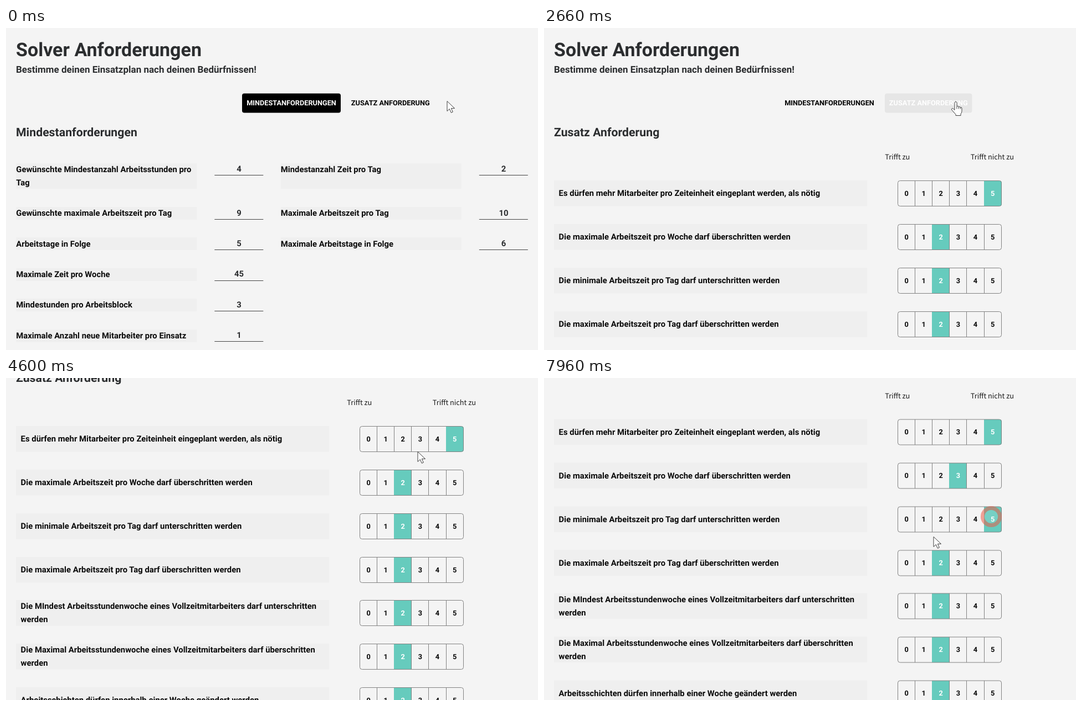
Write an HTML page that moves like this. It is 960 by 583 pixels and loops after 8 s.

```html
<!DOCTYPE html>
<html lang="de">
<head>
<meta charset="utf-8">
<title>Solver Anforderungen</title>
<style>
  html, body { margin: 0; width: 100%; height: 100%; overflow: hidden; background: #f4f4f4; }
  svg { display: block; width: 960px; height: 583px; }
  text { font-family: Roboto, sans-serif; font-weight: 700; text-rendering: geometricPrecision; }
  .title { font-size: 34px; fill: #2b2d2f; }
  .sub { font-size: 17px; fill: #2b2d2f; }
  .head { font-size: 21.25px; fill: #2b2d2f; }
  .label { font-size: 14.85px; fill: #0a0a0a; }
  .value { font-size: 14.85px; fill: #2b2d2f; text-anchor: middle; }
  .tab { font-size: 12.75px; text-anchor: middle; }
  .digit { font-size: 12.75px; text-anchor: middle; fill: #0a0a0a; }
  .scale { font: 400 12.75px 'Noto Sans CJK JP', 'Noto Sans CJK SC', 'Noto Sans CJK', 'Noto Sans', sans-serif; fill: #1c1c1c; }
  .cursor path { fill: #fff; stroke: #333; stroke-width: .95; stroke-linejoin: round; }
</style>
</head>
<body>
<svg viewBox="0 0 960 583">
  <rect width="960" height="583" fill="#f4f4f4"/>
  <g id="page">
    <text class="title" x="18" y="50.5">Solver Anforderungen</text>
    <text class="sub" x="18" y="81">Bestimme deinen Einsatzplan nach deinen Bedürfnissen!</text>
    <g id="tabs"></g>
    <g id="basic"></g>
    <g id="extra"></g>
  </g>
  <circle id="ring" fill="#fff" fill-opacity=".2" stroke="#eb5a46" stroke-width="7"/>
  <g id="arrow" class="cursor"><path d="M0 0V18l4.3-4 3 6.8 3-1.3-2.9-6.6H13.5Z"/></g>
  <g id="hand" class="cursor">
    <path d="M-2 15V2q0-2 2-2t2 2V9q1-2 3-.5l.5 1q2-1.2 3 .6 2.5-.6 2.5 2V17q0 3-2 5V25H0V23L-7 15q-1.5-2 .5-3 1.5-.5 4.5 3Z"/>
    <path d="M2 9v4M5.5 9.5v3.5M8.6 10v3"/>
  </g>
</svg>
<script>
const LOOP = 8000, TICK = 70;
const $ = id => document.getElementById(id);
const text = (cls, x, y, s, attr = '') => `<text class="${cls}" x="${x}" y="${y}" ${attr}>${s}</text>`;
const rect = (x, y, w, h, fill) => `<rect x="${x}" y="${y}" width="${w}" height="${h}" fill="${fill}"/>`;

// Minimum requirements: label and value pairs
const left = [
  ['Gewünschte Mindestanzahl Arbeitsstunden pro|Tag', 4],
  ['Gewünschte maximale Arbeitszeit pro Tag', 9],
  ['Arbeitstage in Folge', 5],
  ['Maximale Zeit pro Woche', 45],
  ['Mindestunden pro Arbeitsblock', 3],
  ['Maximale Anzahl neue Mitarbeiter pro Einsatz', 1]
];
const right = [
  ['Mindestanzahl Zeit pro Tag', 2],
  ['Maximale Arbeitszeit pro Tag', 10],
  ['Maximale Arbeitstage in Folge', 6]
];

function field([label, value], i, x) {
  const top = i ? 324 + 55.4 * (i - 1) : 244.6;
  return rect(x, Math.round(top), 326, i ? 23 : 46, '#efefef') +
    label.split('|').map((s, k) => text('label', x, top + 16.2 + 24 * k, s)).join('') +
    text('value', x + 402.3, top + 15.6, value) +
    rect(x + 358, Math.round(top + 21.8), 88, 1, '#444');
}

$('basic').innerHTML = text('head', 18, 195.5, 'Mindestanforderungen') +
  left.map((f, i) => field(f, i, 18.3)).join('') +
  right.map((f, i) => field(f, i, 495.8)).join('');

// Additional requirements: rated statements
const statements = [
  'Es dürfen mehr Mitarbeiter pro Zeiteinheit eingeplant werden, als nötig',
  'Die maximale Arbeitszeit pro Woche darf überschritten werden',
  'Die minimale Arbeitszeit pro Tag darf unterschritten werden',
  'Die maximale Arbeitszeit pro Tag darf überschritten werden',
  'Die MIndest Arbeitsstundenwoche eines Vollzeitmitarbeiters darf unterschritten|werden',
  'Die Maximal Arbeitsstundenwoche eines Vollzeitmitarbeiters darf überschritten|werden',
  'Arbeitsschichten dürfen innerhalb einer Woche geändert werden'
];
const CELL = 31.1, CELLS_X = 638.5;
const rowTop = i => Math.round(276 + 78.85 * i);

function statement(s, i) {
  const y = rowTop(i), lines = s.split('|');
  return rect(18, y, 565, 46.5, '#efefef') +
    lines.map((l, k) => text('label', 26.6, y + (lines.length > 1 ? 16 : 28) + 24 * k, l)).join('') +
    `<g id="row${i}" transform="translate(${CELLS_X} ${y + .5})"></g>`;
}

function cells(sel) {
  const x = Math.round(sel * CELL) - .5, r = sel === 5 ? 4 : 0;
  let s = `<path fill="#66cbbd" d="M${x} 0H${x + 32 - r}q${r} 0 ${r} ${r}V${46 - r}q0 ${r} ${-r} ${r}H${x}Z"/>`;
  s += '<rect width="187" height="46" rx="4" fill="none" stroke="#828282"/>';
  for (let n = 0; n < 6; n++) {
    if (n && n !== sel) s += `<path stroke="#828282" d="M${Math.round(n * CELL)} 0v46"/>`;
    s += text('digit', (n + .5) * CELL, 27, n, n === sel ? 'style="fill:#fff"' : '');
  }
  return s;
}

$('extra').innerHTML = text('head', 18, 195.5, 'Zusatz Anforderung') +
  text('scale', 615.3, 238, 'Trifft zu') + text('scale', 769.8, 238, 'Trifft nicht zu') +
  statements.map(statement).join('');

const shown = [];
function choose(i, sel) {
  if (shown[i] === sel) return;
  shown[i] = sel;
  $('row' + i).innerHTML = cells(sel);
}

const tabs = [
  { x: 426, w: 178, name: 'MINDESTANFORDERUNGEN' },
  { x: 615, w: 157.5, name: 'ZUSATZ ANFORDERUNG' }
];
let tabState;
function drawTabs(active, hover) {
  const state = active + '/' + hover;
  if (state === tabState) return;
  tabState = state;
  $('tabs').innerHTML = tabs.map(({ x, w, name }, i) => {
    const fill = i === hover ? '#e6e6e6' : i === active ? '#000' : 'none';
    return `<rect x="${x}" y="118.5" width="${w}" height="35" rx="4" fill="${fill}"/>` +
      text('tab', x + w / 2, 139.5, name, `fill="${fill === 'none' ? '#000' : '#fff'}"`);
  }).join('');
}

// Progress of a move, advancing in ticks as on a screen recording
function progress(t, from, to) {
  if (t >= to) return 1;
  if (t < from) return 0;
  return (Math.floor((t - from) / TICK) * TICK) / (to - from);
}
const smooth = p => p * p * (3 - 2 * p);
const cubic = p => p < .5 ? 4 * p ** 3 : 1 - 4 * (1 - p) ** 3;

// from, to, x, y
const moves = [
  [200, 200, 795, 131], [1320, 1320, 794, 131], [1320, 1880, 743, 133],
  [5540, 5750, 738, 155], [5750, 6020, 756, 185],
  [6620, 7020, 801, 247], [7150, 7280, 807, 251], [7750, 7960, 703, 287]
];
function pointer(t) {
  let x = 796, y = 132;
  for (const [from, to, nx, ny] of moves) {
    const p = smooth(progress(t, from, to));
    x += (nx - x) * p;
    y += (ny - y) * p;
  }
  return { x, y };
}

// The wheel starts a little before its first visible tick
const SCROLL_1 = 106, SCROLL_END = 201.5;
function scrollAt(t) {
  const wheel = (start, lead, dur) => {
    if (t < start) return 0;
    const passed = Math.floor((t - start) / TICK) * TICK;
    return cubic(Math.min(1, (passed + lead) / dur));
  };
  return SCROLL_1 * wheel(3780, 45, 325) + (SCROLL_END - SCROLL_1) * wheel(4320, 18, 438);
}

const TAB_CLICK = 2060, CLICK_2 = 6280, CLICK_3 = 7680, RING_LIFE = 600;
const clicks = [[TAB_CLICK, 743, 134], [CLICK_2, 756, 186], [CLICK_3, 807, 251]];

function drawRing(t) {
  const hit = clicks.find(([at]) => t >= at && t < at + RING_LIFE);
  $('ring').style.display = hit ? '' : 'none';
  if (!hit) return;
  const [at, x, y] = hit, p = progress(t, at, at + RING_LIFE);
  $('ring').setAttribute('cx', x);
  $('ring').setAttribute('cy', y);
  $('ring').setAttribute('r', 6 + 20.5 * p);
  $('ring').setAttribute('opacity', 1 - p);
}

function draw(t) {
  const scroll = scrollAt(t), { x, y } = pointer(t), active = t < TAB_CLICK ? 0 : 1;
  $('page').setAttribute('transform', `translate(0 ${-Math.round(scroll * 2) / 2})`);
  $('basic').style.display = active ? 'none' : '';
  $('extra').style.display = active ? '' : 'none';

  // Hover is only re-evaluated once a scroll has settled
  const py = y + (t < 4060 ? 0 : t < 4740 ? SCROLL_1 : SCROLL_END);
  const hover = tabs.findIndex(b => x > b.x && x < b.x + b.w && py > 118 && py < 154);
  const overCells = active && x > CELLS_X && x < CELLS_X + 187 &&
    statements.some((_, i) => py >= rowTop(i) && py <= rowTop(i) + 47);
  drawTabs(active, hover);

  statements.forEach((_, i) => choose(i, i === 0 ? 5
    : i === 1 && t >= CLICK_2 ? 3
    : i === 2 && t >= CLICK_3 ? 5 : 2));

  drawRing(t);
  const isHand = hover >= 0 || overCells;
  $('hand').style.display = isHand ? '' : 'none';
  $('arrow').style.display = isHand ? 'none' : '';
  $(isHand ? 'hand' : 'arrow').setAttribute('transform', `translate(${x} ${y + .5})`);
}

const begin = performance.now();
function frame() {
  draw((performance.now() - begin) % LOOP);
  requestAnimationFrame(frame);
}
frame();
</script>
</body>
</html>
```
